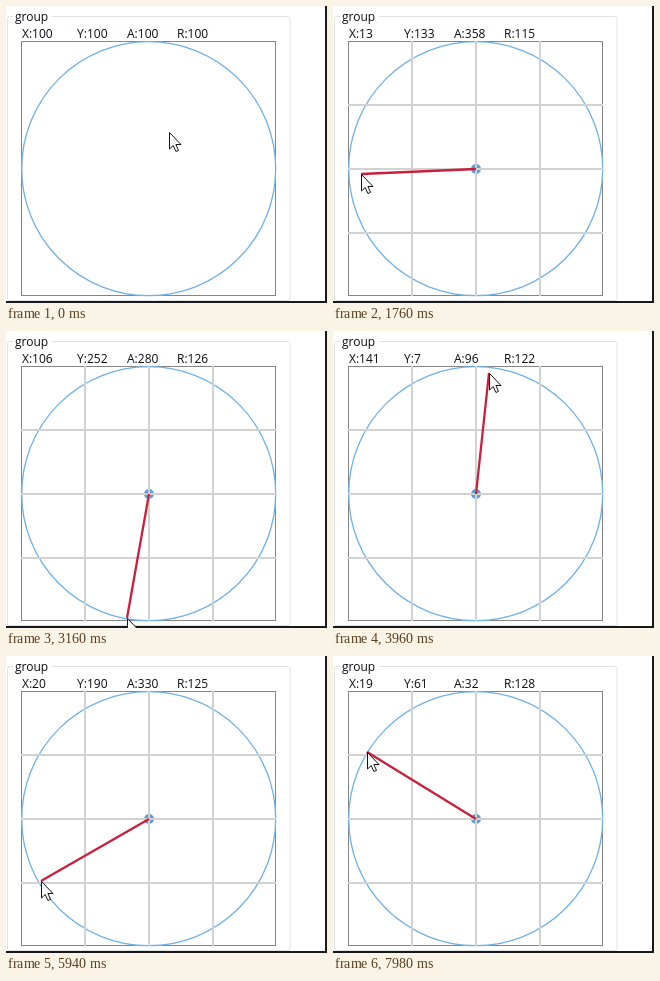
Write an HTML page that moves like this. It is 321 px wide and 297 px high and loops after 8000 ms.

```html
<!DOCTYPE html>
<html lang="en">
<head>
<meta charset="utf-8">
<title>Polar picker</title>
<style>
  html, body { margin: 0; width: 100%; height: 100%; overflow: hidden; background: #fff; }
  svg { display: block; }
  text { font: 12px "Open Sans", "Noto Sans", sans-serif; fill: #0c0c14; }
</style>
</head>
<body>
<svg width="321" height="297" viewBox="0 0 321 297">
  <path d="M7 10.5H3.5Q1.5 10.5 1.5 12.5V292.5Q1.5 294.5 3.5 294.5H282Q284 294.5 284 292.5V12.5Q284 10.5 282 10.5H46" fill="none" stroke="#dfe3e6"/>
  <path d="M320 0V296H0" fill="none" stroke="#18181c" stroke-width="2"/>
  <text x="9" y="15">group</text>
  <text id="x" x="16" y="32"></text>
  <text id="y" x="71" y="32"></text>
  <text id="a" x="121" y="32"></text>
  <text id="r" x="171" y="32"></text>
  <rect x="15.5" y="35.5" width="254" height="254" fill="none" stroke="#858585"/>
  <circle cx="142.7" cy="162.7" r="127" fill="none" stroke="#6fb1e6" stroke-width="1.3"/>
  <g id="drag">
    <circle cx="143" cy="163" r="5" fill="#5f9fd2"/>
    <path d="M79 35V290M143 35V290M207 35V290M15 99H270M15 163H270M15 227H270" stroke="#d2d2d2" stroke-width="2"/>
    <line id="arm" x1="143" y1="163" stroke="#c8203c" stroke-width="2.3"/>
  </g>
  <path id="cursor" d="M0 0V16.5L3.7 13L6.4 19L9 17.9L6.4 12H11.5Z" fill="#fff" stroke="#111"/>
</svg>
<script>
  const LOOP = 8000, STEP = 20, PRESS = 200, RADIUS = 128;
  const CENTER = { x: 143, y: 163 };
  const $ = id => document.getElementById(id);

  // angle in degrees: 0 = left, 90 = top; reach = pointer distance from the centre
  const pose = (at, angle, reach = 130) => ({ at, angle, reach });
  const poses = [
    pose(PRESS, 118.4, 42),
    pose(820, 172),
    pose(1100, 138.3, 97.7),
    pose(2360, -144.6),
    pose(2500, -172),
    pose(3960, 96.1, 121.7),
    pose(4700, 178),
    pose(5200, 37.7, 170),
    pose(5860, -36),
    pose(6840, 285.8, 77),
    pose(7980, 31.6, 128)
  ];

  const secant = (i, key) =>
    (poses[i + 1][key] - poses[i][key]) / (poses[i + 1].at - poses[i].at);

  // harmonic mean: smooth through poses, at rest where the hand turns back
  function slope(i, key) {
    if (i === 0 || i === poses.length - 1) return 0;
    const p = secant(i - 1, key), q = secant(i, key);
    return p * q > 0 ? 2 * p * q / (p + q) : 0;
  }

  function sample(t, key) {
    let i = 0;
    while (i < poses.length - 2 && t >= poses[i + 1].at) i++;
    const from = poses[i], to = poses[i + 1], span = to.at - from.at;
    const u = Math.min(1, Math.max(0, (t - from.at) / span)), v = 1 - u;
    return v * v * (1 + 2 * u) * from[key] + u * u * (1 + 2 * v) * to[key]
      + span * u * v * (v * slope(i, key) - u * slope(i + 1, key));
  }

  function polar(angle, r) {
    const rad = angle * Math.PI / 180;
    return { x: Math.round(-r * Math.cos(rad)), y: Math.round(-r * Math.sin(rad)) };
  }

  function draw(now) {
    const t = Math.floor(now % LOOP / STEP) * STEP;
    const angle = sample(t, "angle"), reach = sample(t, "reach");
    const tip = polar(angle, reach);
    $("cursor").setAttribute("transform",
      `translate(${CENTER.x + tip.x + 0.5} ${CENTER.y + tip.y + 0.5})`);

    const pressed = t >= PRESS;
    const r = Math.min(RADIUS, reach), end = polar(angle, r);
    $("drag").style.display = pressed ? "" : "none";
    $("arm").setAttribute("x2", CENTER.x + end.x);
    $("arm").setAttribute("y2", CENTER.y + end.y);

    const values = {
      x: RADIUS + end.x,
      y: RADIUS + end.y,
      a: Math.round((angle + 360) % 360),
      r: Math.round(r)
    };
    for (const id in values)
      $(id).textContent = `${id.toUpperCase()}:${pressed ? values[id] : 100}`;
  }

  let start;
  function tick(now) {
    start ??= now;
    draw(now - start);
    requestAnimationFrame(tick);
  }
  draw(0);
  requestAnimationFrame(tick);
</script>
</body>
</html>
```
